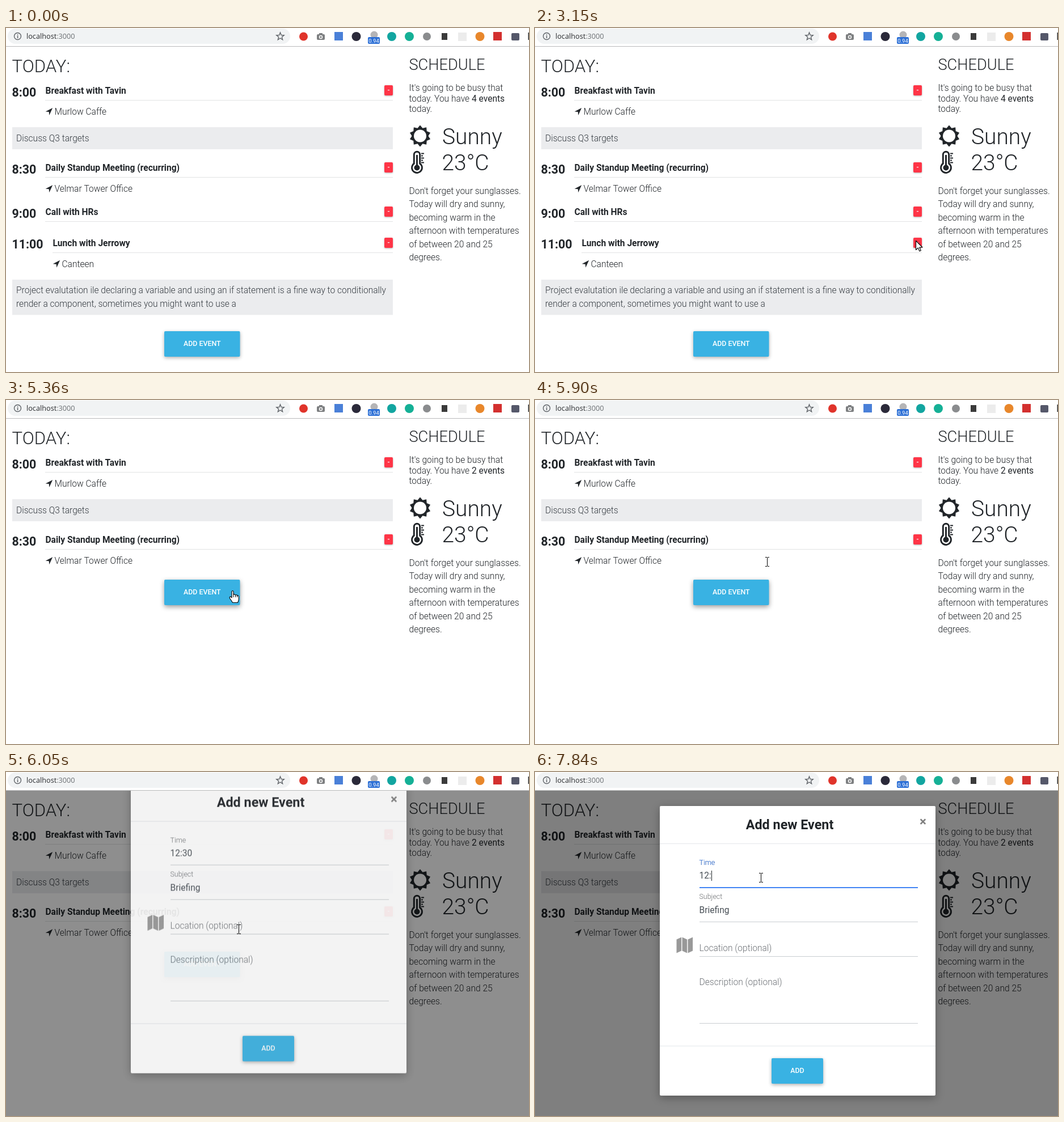
An HTML page with a canvas for the animation above (7.99 s loop, 922x607 px).

```html
<!DOCTYPE html>
<html lang="en">
<head>
<meta charset="utf-8">
<title>Schedule</title>
<style>
  html, body { margin: 0; width: 100%; height: 100%; overflow: hidden; background: #fff; }
  canvas { display: block; }
</style>
</head>
<body>
<canvas id="stage" width="922" height="607"></canvas>
<script>
const W = 922, H = 607, LOOP = 7990, STEP = 76.9, FIRST = 125;
const BODY = 15.57;
const INK = '#212529', BLUE = '#39b2e3', RED = '#ff3547', FOCUS = '#4285f4';
const stage = document.getElementById('stage').getContext('2d');
const layer = document.createElement('canvas');
layer.width = W;
layer.height = H;
const sheet = layer.getContext('2d');
let c = stage;

const ROWS = [
  { y: 0, x: 69, time: '8:00', title: 'Breakfast with Tavin', place: 'Murlow Caffe', notes: ['Discuss Q3 targets'] },
  { y: 136.3, x: 69, time: '8:30', title: 'Daily Standup Meeting (recurring)', place: 'Velmar Tower Office' },
  { y: 214, x: 69, time: '9:00', title: 'Call with HRs' },
  { y: 268.7, x: 82, time: '11:00', title: 'Lunch with Jerrowy', place: 'Canteen', notes: [
    'Project evalutation ile declaring a variable and using an if statement is a fine way to conditionally',
    'render a component, sometimes you might want to use a'] }
];
const BUTTON_TOP = { 2: 317, 3: 372, 4: 535 };
const FORECAST = ["Don't forget your sunglasses.", 'Today will dry and sunny,', 'becoming warm in the',
  'afternoon with temperatures', 'of between 20 and 25', 'degrees.'];

// Pointer stops: time, x, y
const PATH = [
  [125, 645, 570], [510, 735, 300], [900, 848, 104], [980, 838, 108], [1210, 734, 148], [1440, 821.5, 102.5],
  [1750, 864, 140], [1900, 845, 115], [2050, 765, 135], [2140, 765, 135], [2450, 652, 425], [2830, 674, 380],
  [3020, 674, 380], [3120, 671, 375], [3620, 671, 375], [3900, 672, 321], [4080, 672, 321], [4460, 868, 125],
  [4720, 742, 134], [4930, 864, 112], [5280, 420, 334], [5350, 399.5, 336.5], [5660, 399.5, 336.5],
  [5960, 410.5, 277.5], [6050, 410.5, 277.5], [6580, 397.5, 212.5], [6620, 397.5, 212.5], [6980, 398.5, 186]
];
const DELETED = [3220, 4000], OPENED = 5913, FOCUSED = 7055;

const clamp = v => Math.max(0, Math.min(1, v));

function text(str, x, y, size, weight = 300, color = INK, align = 'left', family = 'Roboto') {
  c.font = `${weight} ${size}px ${family}, sans-serif`;
  c.fillStyle = color;
  c.textAlign = align;
  c.fillText(str, x, y);
}

function rect(x, y, w, h, color) {
  c.fillStyle = color;
  c.fillRect(x, y, w, h);
}

function round(x, y, w, h, r, color) {
  c.fillStyle = color;
  c.beginPath();
  c.roundRect(x, y, w, h, r);
  c.fill();
}

function disc(x, y, r, color) {
  c.fillStyle = color;
  c.beginPath();
  c.arc(x, y, r, 0, 7);
  c.fill();
}

function shadowed(blur, dy, alpha, draw) {
  c.save();
  c.shadowColor = `rgba(0,0,0,${alpha})`;
  c.shadowBlur = blur;
  c.shadowOffsetY = dy;
  draw();
  c.restore();
}

function button(x, y, w, label, lift) {
  shadowed(lift ? 9 : 6, lift ? 3 : 2, lift ? 0.4 : 0.32, () => round(x, y, w, 45, 2, BLUE));
  text(label, x + w / 2, y + 26.3, 12.4, 500, '#fff', 'center');
}

function star(x, y, n, outer, inner) {
  c.beginPath();
  for (let i = 0; i < 2 * n; i++) {
    const a = i * Math.PI / n - Math.PI / 2, r = i % 2 ? inner : outer;
    c.lineTo(x + r * Math.cos(a), y + r * Math.sin(a));
  }
  c.closePath();
}

function toolbar() {
  rect(0, 0, W, 33, '#fff');
  rect(0, 32, W, 1, '#b9babb');
  round(3, 1, 498, 27, 13.5, '#f1f3f4');
  c.strokeStyle = '#5f6368';
  c.lineWidth = 1.4;
  c.beginPath();
  c.arc(20.5, 14.5, 6, 0, 7);
  c.stroke();
  rect(19.8, 13.5, 1.5, 4.5, '#5f6368');
  rect(19.8, 11, 1.5, 1.5, '#5f6368');
  text('localhost', 36, 19, 12.7, 400, '#2b2d30', 'left', '"Open Sans"');
  const w = c.measureText('localhost').width;
  text(':3000', 36 + w, 19, 12.7, 400, '#6d7175', 'left', '"Open Sans"');
  star(483.5, 15, 5, 7, 3);
  c.stroke();

  disc(524.5, 15, 7.5, '#e0342b');
  round(548, 11, 14, 10, 2, '#7d7f81');
  rect(552, 9, 6, 3, '#7d7f81');
  disc(555, 16, 3.2, '#fff');
  disc(555, 16, 1.8, '#7d7f81');
  rect(579, 7, 15, 15, '#4a80d8');
  disc(617.5, 15, 8, '#2b2a3a');
  disc(649, 12, 6.5, '#b5b5b7');
  round(638, 16, 21, 12, 2, '#2d70d6');
  text('0.94', 648.5, 25.5, 9.5, 400, '#fff', 'center');
  disc(680, 15, 8, '#12a5a0');
  disc(711, 15, 8, '#15b096');
  disc(742, 15, 7, '#8a8c8e');
  rect(768, 9, 10, 12, '#3b3b3b');
  rect(797, 8, 15, 15, '#ececec');
  disc(835.5, 15, 8, '#e8872b');
  rect(859, 7, 15, 15, '#d3302f');
  round(891, 9, 14, 13, 2, '#55586a');
  rect(920.5, 8, 2, 13, '#333');
}

function pin(x, y) {
  c.fillStyle = INK;
  c.beginPath();
  for (const [px, py] of [[12.5, 0], [0, 6.5], [6, 7], [6.5, 13]]) c.lineTo(x + px, y + py);
  c.fill();
}

function row({ y, x, time, title, place, notes }) {
  text(time, 10.5, 120.5 + y, 21.4, 700);
  text(title, x + 0.5, 116 + y, BODY, 700);
  rect(x, Math.round(127 + y), 682 - x, 1, '#e2e3e4');
  const top = Math.round(101 + y);
  shadowed(3, 1, 0.3, () => round(667, top, 15, 18, 2, RED));
  text('-', 674.5, top + 13, 12, 500, '#fff', 'center');
  if (place) {
    pin(x + 0.7, 141 + y);
    text(place, x + 16.5, 153 + y, BODY);
  }
  if (notes) {
    rect(11, Math.round(175 + y), 671, 15.5 + 23.4 * notes.length, '#ebecee');
    notes.forEach((line, i) => text(line, 18, 199.5 + y + i * 23.4, BODY, 300, '#343a40'));
  }
}

function weather() {
  star(730, 190.5, 10, 19, 14.5);
  c.fillStyle = INK;
  c.fill();
  disc(730, 190.5, 11, '#fff');
  text('Sunny', 769, 205, 38.9);

  c.strokeStyle = INK;
  c.lineWidth = 3;
  c.beginPath();
  c.arc(724.5, 246.5, 9, -0.95, Math.PI + 0.95);
  c.lineTo(719.3, 223);
  c.arc(724.5, 223.5, 5.2, Math.PI, 0);
  c.closePath();
  c.stroke();
  disc(724.5, 246.5, 5, INK);
  rect(723, 224, 3, 20, INK);
  for (let i = 0; i < 5; i++) rect(732, 220.5 + i * 4, i % 2 ? 3 : 5, 2, INK);
  text('23°C', 768.5, 251, 38.9);
}

function sidebar(count) {
  text('SCHEDULE', 710.5, 73.5, 27.2);
  text("It's going to be busy that", 710.5, 111, BODY);
  text('today. You have ', 710.5, 129.7, BODY);
  const w = c.measureText('today. You have ').width;
  text(`${count} events`, 710.5 + w, 129.7, BODY, 400);
  text('today.', 710.5, 148, BODY);
  weather();
  FORECAST.forEach((line, i) => text(line, 710.5, 293 + i * 23.4, BODY));
}

function field(label, value, y) {
  text(label, 289.5, y, 12.45, 300, '#6a6d70');
  text(value, 289.5, y + 24.5, BODY, 400, '#495057');
}

function mapIcon(x, y) {
  c.fillStyle = '#999';
  for (let i = 0; i < 3; i++) {
    const l = x + i * 10, d = i % 2 ? 0 : 4;
    c.beginPath();
    c.moveTo(l, y + d);
    c.lineTo(l + 8.6, y + 4 - d);
    c.lineTo(l + 8.6, y + 28 - d);
    c.lineTo(l, y + 24 + d);
    c.fill();
  }
}

function form(t) {
  shadowed(16, 4, 0.3, () => round(220, 60, 486, 511, 2, '#fff'));
  text('Add new Event', 449, 101, 23.35, 700, INK, 'center');
  text('×', 684, 95, 22.5, 700, '#7f7f7f', 'center');
  rect(220, 126, 486, 1, '#e4e7ea');
  rect(220, 483, 486, 1, '#e4e7ea');

  const active = t >= FOCUSED;
  const value = t < 7435 ? '12:30' : t < 7510 ? '12:3' : '12:';
  field('Time', value, 163.5);
  if (active) {
    const w = (c.font = `400 ${BODY}px Roboto, sans-serif`, c.measureText(value).width);
    if (t < 7510 || t > 7800) rect(Math.round(289.5 + w), 174, 1, 18, INK);
    text('Time', 289.5, 163.5, 12.45, 300, FOCUS);
  }
  field('Subject', 'Briefing', 224.3);
  mapIcon(249.5, 291.5);
  text('Location (optional)', 289.5, 315.5, BODY, 300, '#6c7075');
  text('Description (optional)', 289.5, 375.5, BODY, 300, '#6c7075');
  for (const y of [203, 264, 325, 443]) rect(290, y, 385, 1, '#c9cdd1');
  if (active) rect(290, 203, 385, 2, FOCUS);
  button(417, 505, 91, 'ADD');
}

function modal(t) {
  const age = t - OPENED;
  if (age <= 0) return;
  const fade = clamp(age / 150), drop = (1 - clamp(age / 300)) ** 2;
  rect(0, 33, W, H - 33, `rgba(0,0,0,${0.5 * fade})`);
  c = sheet;
  c.clearRect(0, 0, W, H);
  form(t);
  c = stage;
  c.save();
  c.beginPath();
  c.rect(0, 33, W, H - 33);
  c.clip();
  c.globalAlpha = fade;
  c.drawImage(layer, 0, -127.75 * drop);
  c.restore();
}

const ARROW = new Path2D('M0 0V16L3.8 12.4L6.3 18.3L8.8 17.2L6.3 11.5H11.5Z');
const HAND = new Path2D('M-1.5 1.5Q0 -1.5 1.5 1.5V7Q3.5 5.5 5 7.7Q7 6.5 8 8.7Q10.5 8 10.8 10.5V15Q10.5 18 9 21H0Q-2 17.5 -5 13.5Q-6 11 -4 10.5Q-2.5 10.5 -1.5 12.5Z');

function pointerAt(t) {
  const i = PATH.findIndex(p => p[0] > t);
  if (i < 0) return PATH[PATH.length - 1].slice(1);
  const [t0, x0, y0] = PATH[i - 1], [t1, x1, y1] = PATH[i];
  const p = (t - t0) / (t1 - t0), k = p * p * (3 - 2 * p);
  return [x0 + (x1 - x0) * k, y0 + (y1 - y0) * k];
}

function pointerKind(x, y, open, top) {
  const within = (a, b) => y > a && y < b;
  if (open) return within(170, 204) || within(232, 264) || within(272, 325) ? 'beam' : 'arrow';
  if (x > 279 && x < 412 && within(top, top + 45)) return 'hand';
  if (x > 710 && (within(97, 153) || within(280, 415))) return 'beam';
  return x < 682 && within(272, 295) ? 'beam' : 'arrow';
}

function pointer(t, top) {
  const [x, y] = pointerAt(t).map(v => Math.round(v - 0.5) + 0.5);
  const kind = pointerKind(x, y, t > OPENED, top);
  c.save();
  c.translate(x, y);
  if (kind === 'beam') {
    rect(-0.5, -7.5, 1, 15, '#000');
    for (const s of [-8.5, 7.5]) {
      rect(-3.5, s, 3, 1, '#000');
      rect(0.5, s, 3, 1, '#000');
    }
  } else {
    const shape = kind === 'hand' ? HAND : ARROW;
    c.fillStyle = '#fff';
    c.strokeStyle = '#000';
    c.lineWidth = 1.1;
    c.lineJoin = 'round';
    c.fill(shape);
    c.stroke(shape);
    if (kind === 'hand') {
      for (const dx of [1.5, 5, 8]) rect(dx - 0.5, 7.5, 1, 4, '#000');
    }
  }
  c.restore();
}

function draw(t) {
  const count = 4 - DELETED.filter(d => t >= d).length, top = BUTTON_TOP[count];
  rect(0, 0, W, H, '#fff');
  toolbar();
  text('TODAY:', 10.5, 78, 31.1);
  ROWS.slice(0, count).forEach(row);
  button(279, top, 133.5, 'ADD EVENT', t >= 5340);
  sidebar(count);
  modal(t);
  if (t >= FIRST) pointer(t, top);
}

function tick(now) {
  const t = now % LOOP;
  draw(t < FIRST ? 0 : FIRST + Math.floor((t - FIRST) / STEP) * STEP);
  requestAnimationFrame(tick);
}
requestAnimationFrame(tick);
</script>
</body>
</html>
```
